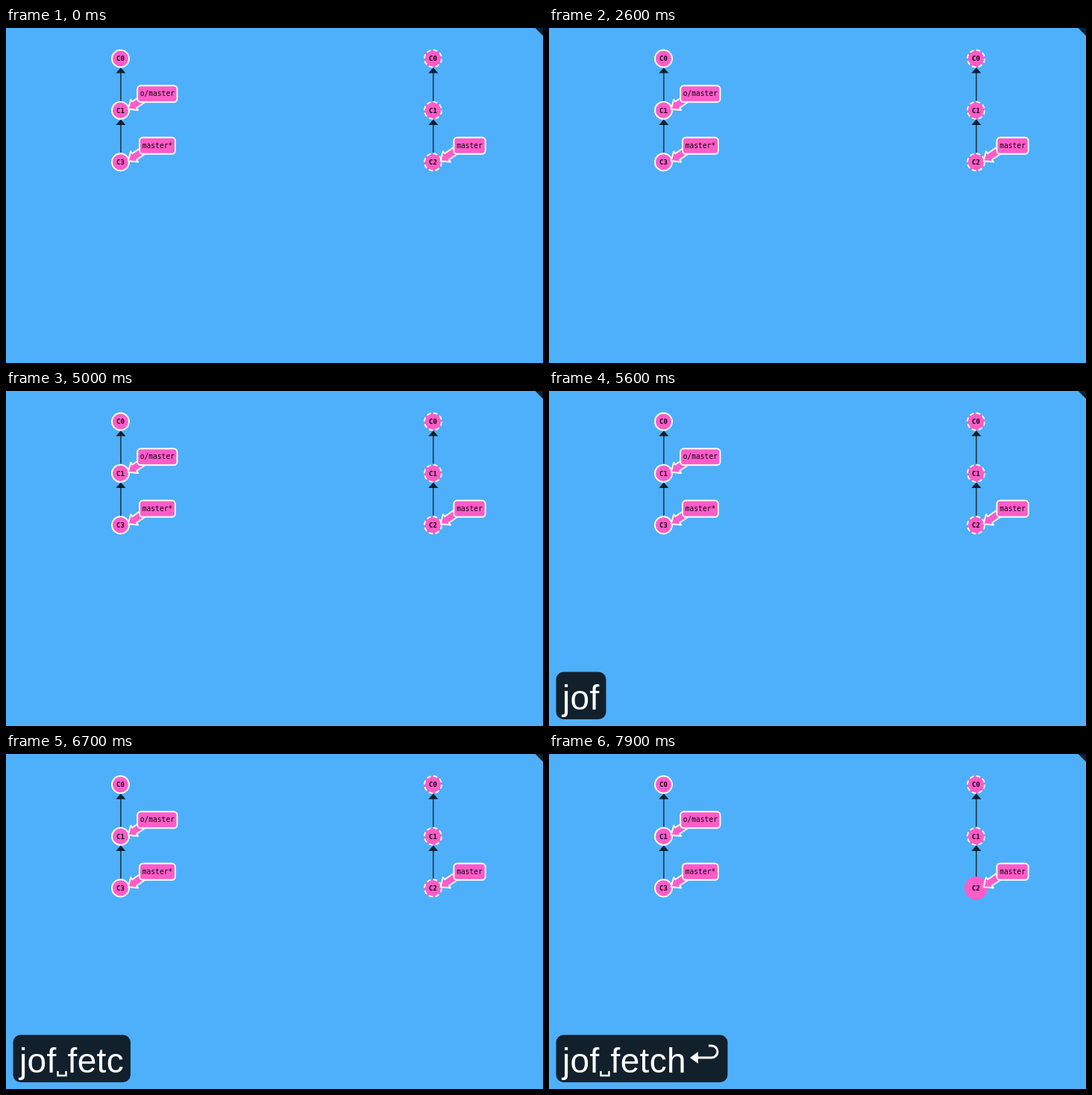
Recreate the animation shown at these times as an HTML page. Size 720 px wide and 449 px high, loop 8000 ms.

```html
<!DOCTYPE html>
<html lang="en">
<head>
<meta charset="utf-8">
<title>Fetch demo</title>
<style>
  html, body { margin: 0; width: 100%; height: 100%; overflow: hidden; background: #4eb0fa; }
  svg { display: block; width: 720px; height: 449px; }
  .pink { fill: #ff5cc8; stroke: #fff; stroke-width: 1.9; }
  .dashed { stroke-dasharray: 5.6 3.43; }
  .edge { stroke: #1f2c38; stroke-width: 1.5; }
  .dark { fill: #12202c; }
  .label { font: 9.6px "DejaVu Sans Mono", monospace; text-anchor: middle; fill: #0a040c; }
  .node { font-size: 9px; font-weight: bold; }
  .typed { font: 46px "Liberation Sans", Arial, sans-serif; letter-spacing: 0.3px; fill: #fff; }
  .sign { fill: none; stroke: #fff; stroke-width: 3; }
</style>
</head>
<body>
<svg id="stage" viewBox="0 0 720 449">
  <path d="M709.5 0H720V10.5Z" class="dark"/>
  <g id="tree"></g>
  <g id="keys">
    <rect id="panel" class="dark" x="9.5" y="376.5" height="63.5" rx="10"/>
    <text id="tool" class="typed" x="18" y="427"></text>
    <path id="space" class="sign" d="M69.5 425V431H80.5V425" style="stroke-width:2.4"/>
    <text id="verb" class="typed" x="82.6" y="427"></text>
    <g id="enter">
      <path class="sign" d="M214 391H218A8 8 0 0 1 218 407H198"/>
      <path d="M189 407L200 399V415Z" fill="#fff"/>
    </g>
  </g>
</svg>
<script>
const LOOP = 8000;
const TOOL = "jof", VERB = "fetch";
const PRESSES = [5200, 5300, 5500, 5800, 6100, 6300, 6500, 6650, 6850, 7150];
const PULSE = { start: 7480, length: 420, grow: 3 };
const RADIUS = 11.5;

const $ = id => document.getElementById(id);

function add(name, attrs, text = "") {
  const el = document.createElementNS("http://www.w3.org/2000/svg", name);
  for (const key in attrs) el.setAttribute(key, attrs[key]);
  el.textContent = text;
  return $("tree").appendChild(el);
}

function commit(x, y, name, remote) {
  const circle = add("circle", { cx: x, cy: y, r: RADIUS, class: remote ? "pink dashed" : "pink" });
  add("text", { x, y: y + 3.3, class: "label node" }, name);
  return circle;
}

function parentLink(x, top) {
  add("path", { d: `M${x} ${top + 6}V${top + 44.5}`, class: "edge" });
  add("path", { d: `M${x} ${top}l6.5 7.5h-13z`, class: "dark" });
}

function branch(tipX, tipY, left, width, name) {
  add("path", {
    d: `M${tipX} ${tipY}l3.4 -13l2.1 3l13 -9l6.2 8.2l-13.4 9l2.1 3z`,
    class: "pink", "stroke-linejoin": "round"
  });
  const top = tipY - 31.5;
  add("rect", { x: left, y: top, width, height: 22, rx: 4.5, class: "pink" });
  add("text", { x: left + width / 2, y: top + 14, class: "label" }, name);
}

function column(x, names, remote) {
  [53, 122.5].forEach(top => parentLink(x + 0.4, top));
  return names.map((name, i) => commit(x, 41 + i * 69.4, name, remote));
}

column(153.5, ["C0", "C1", "C3"], false);
const target = column(572.5, ["C0", "C1", "C2"], true)[2];
branch(163.8, 108.8, 176.2, 53.3, "o/master");
branch(163.8, 178.3, 179, 48, "master*");
branch(582.6, 178.3, 600.4, 42.4, "master");

function show(id, visible) {
  $(id).style.display = visible ? "" : "none";
}

function drawKeys(t) {
  const count = PRESSES.filter(time => time <= t).length;
  show("keys", count > 0);
  if (!count) return;
  $("tool").textContent = TOOL.slice(0, count);
  $("verb").textContent = VERB.slice(0, Math.max(0, count - 4));
  show("space", count > 3);
  show("enter", count > 9);
  const end = count > 9 ? 230.5
    : count > 3 ? 82.6 + $("verb").getComputedTextLength()
    : 18 + $("tool").getComputedTextLength();
  $("panel").setAttribute("width", end - 0.5);
}

function drawPulse(t) {
  const p = Math.min(1, Math.max(0, (t - PULSE.start) / PULSE.length));
  const eased = p * p * (3 - 2 * p);
  const mix = (from, to) => Math.round(from + (to - from) * eased);
  target.setAttribute("r", RADIUS + PULSE.grow * eased);
  target.style.stroke = `rgb(255,${mix(255, 92)},${mix(255, 200)})`;
  target.style.strokeDasharray = p === 1 ? "none" : "";
}

function frame(now) {
  const t = now % LOOP;
  drawKeys(t);
  drawPulse(t);
  requestAnimationFrame(frame);
}
frame(0);
</script>
</body>
</html>
```
